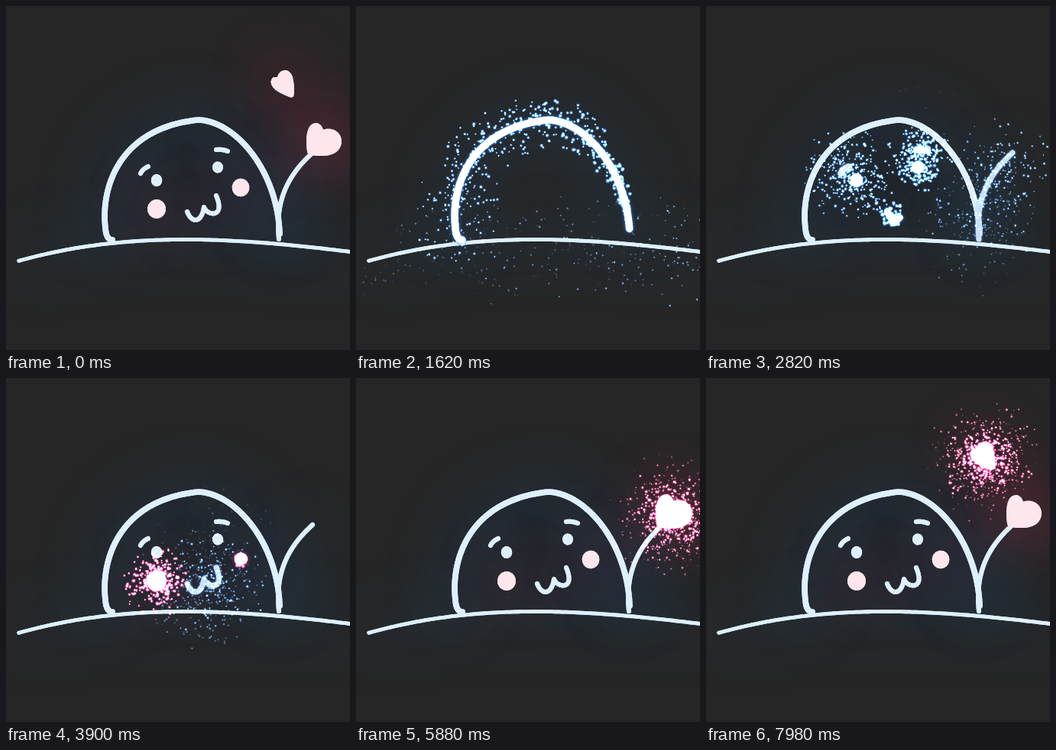
Write an HTML page with a canvas that moves like this. It is 450 px wide and 450 px high and loops after 8000 ms.

```html
<!DOCTYPE html>
<html lang="en">
<head>
<meta charset="utf-8">
<title>Sparkling doodle</title>
<style>
html, body { margin: 0; height: 100%; overflow: hidden; background: #262626; }
canvas { display: block; }
</style>
</head>
<body>
<canvas id="stage" width="450" height="450"></canvas>
<script>
const ctx = document.getElementById('stage').getContext('2d');
const LOOP = 8000, STEP = 60;
const BLUE = { line: '#def0fe', spark: '#2f8cff', glow: 'rgb(30, 105, 165)' };
const PINK = { line: '#fde7ed', spark: '#ff2f85', glow: 'rgb(215, 45, 95)' };
const clamp = v => Math.max(0, Math.min(1, v));

let seed = 7;
function random() {
  seed = (seed * 1664525 + 1013904223) >>> 0;
  return seed / 4294967296;
}

const sample = (n, f) => Array.from({ length: n + 1 }, (_, i) => f(i / n));

// Shapes are lists of points along the pen's way.
function curve(d) {
  const path = document.createElementNS('http://www.w3.org/2000/svg', 'path');
  path.setAttribute('d', d);
  const length = path.getTotalLength();
  return sample(Math.ceil(length / 3), u => {
    const { x, y } = path.getPointAtLength(u * length);
    return { x, y };
  });
}

function hill() {
  return sample(90, u => {
    const k = u * 2.04 - 1.015;
    return { x: 235 + 215 * k, y: 305.5 + 21.5 * k * k - 5.5 * k ** 3 };
  });
}

function spot(cx, cy, rx, ry) {
  return sample(60, u => {
    const r = Math.sqrt(Math.min(1, u * 1.4)), a = u * 26;
    return { x: cx + rx * r * Math.cos(a), y: cy + ry * r * Math.sin(a) };
  });
}

// The outline, then smaller rounds that fill it.
function filled(d, cx, cy) {
  const outline = curve(d);
  return [1, 0.65, 0.3].flatMap(k =>
    outline.map(p => ({ x: cx + (p.x - cx) * k, y: cy + (p.y - cy) * k })));
}

function pointAt(path, p) {
  const d = p * path.at(-1).d;
  const i = Math.max(1, path.findIndex(q => q.d >= d));
  const a = path[i - 1], b = path[i], u = (d - a.d) / (b.d - a.d || 1);
  return { x: a.x + (b.x - a.x) * u, y: a.y + (b.y - a.y) * u };
}

const strokes = [], sparks = [];

function stroke(start, duration, width, ink, path) {
  let d = 0;
  path.forEach((q, i) => {
    if (i) d += Math.hypot(q.x - path[i - 1].x, q.y - path[i - 1].y);
    q.d = d;
  });
  strokes.push({ start, duration, width, ink, path });
  const count = Math.round(100 + 0.8 * duration);
  for (let i = 0; i < count; i++) {
    const p = (i + random()) / count, angle = random() * 2 * Math.PI;
    const reach = 6 + 84 * random() ** 1.15;
    sparks.push({
      ...pointAt(path, p), ink,
      born: start + p * duration,
      life: 1000 + 600 * random(),
      dx: Math.cos(angle) * reach, dy: Math.sin(angle) * reach,
      size: 0.6 + 0.7 * random()
    });
  }
}

// ground, body, arm
stroke(340, 400, 4.8, BLUE, hill());
stroke(980, 650, 7.6, BLUE, curve('M139 306Q131 306 130 290C124 240 146 160 251 149C300 150 355 215 358 298'));
stroke(1780, 360, 6, BLUE, curve('M357 305C352 255 368 222 401 192'));
// brows and eyes
stroke(2200, 60, 6, BLUE, curve('M176 219Q179 213 186 210'));
stroke(2300, 100, 6, BLUE, spot(197, 228, 4.2, 5));
stroke(2440, 60, 6, BLUE, curve('M275 188Q283 187 290 190'));
stroke(2540, 80, 6, BLUE, spot(277, 211, 4, 4.5));
// mouth and cheeks
stroke(2660, 560, 6, BLUE, curve('M237 269C243 285 256 284 259 263C262 274 288 279 275 248'));
stroke(3450, 340, 9, PINK, spot(197, 265.5, 7.5, 8));
stroke(3840, 480, 9, PINK, spot(307, 237.5, 6.8, 7.3));
// large heart, small heart
stroke(4480, 1120, 10, PINK, filled('M399 190C396 170 400 157 406 158C411 160 410 166 411 170C418 163 432 164 434 176C434 190 420 193 399 190', 413, 180));
stroke(6850, 970, 7, PINK, filled('M373 116C362 112 349 106 350 98C351 95 356 97 358 98C357 86 370 83 372 96Q374 106 373 116', 364, 102));

function paint({ path }, progress, width, color, blur, shadow) {
  const limit = progress * path.at(-1).d, end = pointAt(path, progress);
  ctx.beginPath();
  for (const q of path) if (q.d <= limit) ctx.lineTo(q.x, q.y);
  ctx.lineTo(end.x, end.y);
  ctx.lineWidth = width;
  ctx.strokeStyle = color;
  ctx.shadowBlur = blur;
  ctx.shadowColor = shadow;
  ctx.stroke();
  ctx.shadowBlur = 0;
}

function dot(x, y, r, color, alpha) {
  ctx.globalAlpha = clamp(alpha);
  ctx.fillStyle = color;
  ctx.beginPath();
  ctx.arc(x, y, r, 0, 2 * Math.PI);
  ctx.fill();
}

function drawSpark(s, t) {
  const age = t - s.born;
  if (age < 0 || age >= s.life) return;
  const left = 1 - age / s.life, spread = 1 - Math.exp(-age / 600);
  const x = s.x + s.dx * spread, y = s.y + s.dy * spread + 6e-6 * age * age;
  const r = s.size * (0.55 + 0.6 * left);
  dot(x, y, r * 2, s.ink.spark, 0.7 * left);
  dot(x, y, r, '#fff', 1.5 * left);
}

function render(t) {
  // The loop opens on the finished drawing, long after its last spark.
  const time = t < STEP ? Infinity : t;
  const visible = strokes.filter(s => time > s.start).map(s => ({
    s,
    progress: clamp((time - s.start) / s.duration),
    heat: clamp((s.start + s.duration + 850 - time) / 400)
  }));
  ctx.globalCompositeOperation = 'source-over';
  ctx.globalAlpha = 1;
  ctx.fillStyle = '#262626';
  ctx.fillRect(0, 0, 450, 450);
  ctx.lineCap = ctx.lineJoin = 'round';
  for (const { s, progress } of visible) paint(s, progress, s.width, s.ink.line, 78, s.ink.glow);
  for (const { s, progress, heat } of visible) {
    ctx.globalAlpha = 1;
    paint(s, progress, s.width, s.ink.line, 0, 'transparent');
    ctx.globalAlpha = heat;
    if (heat) paint(s, progress, s.width + 2, '#fff', 4, s.ink.spark);
  }
  ctx.globalCompositeOperation = 'lighter';
  for (const s of sparks) drawSpark(s, time);
}

const origin = performance.now();
let shown = -1;
function frame() {
  const t = Math.floor(((performance.now() - origin) % LOOP) / STEP) * STEP;
  if (t !== shown) render(shown = t);
  requestAnimationFrame(frame);
}
frame();
</script>
</body>
</html>
```
